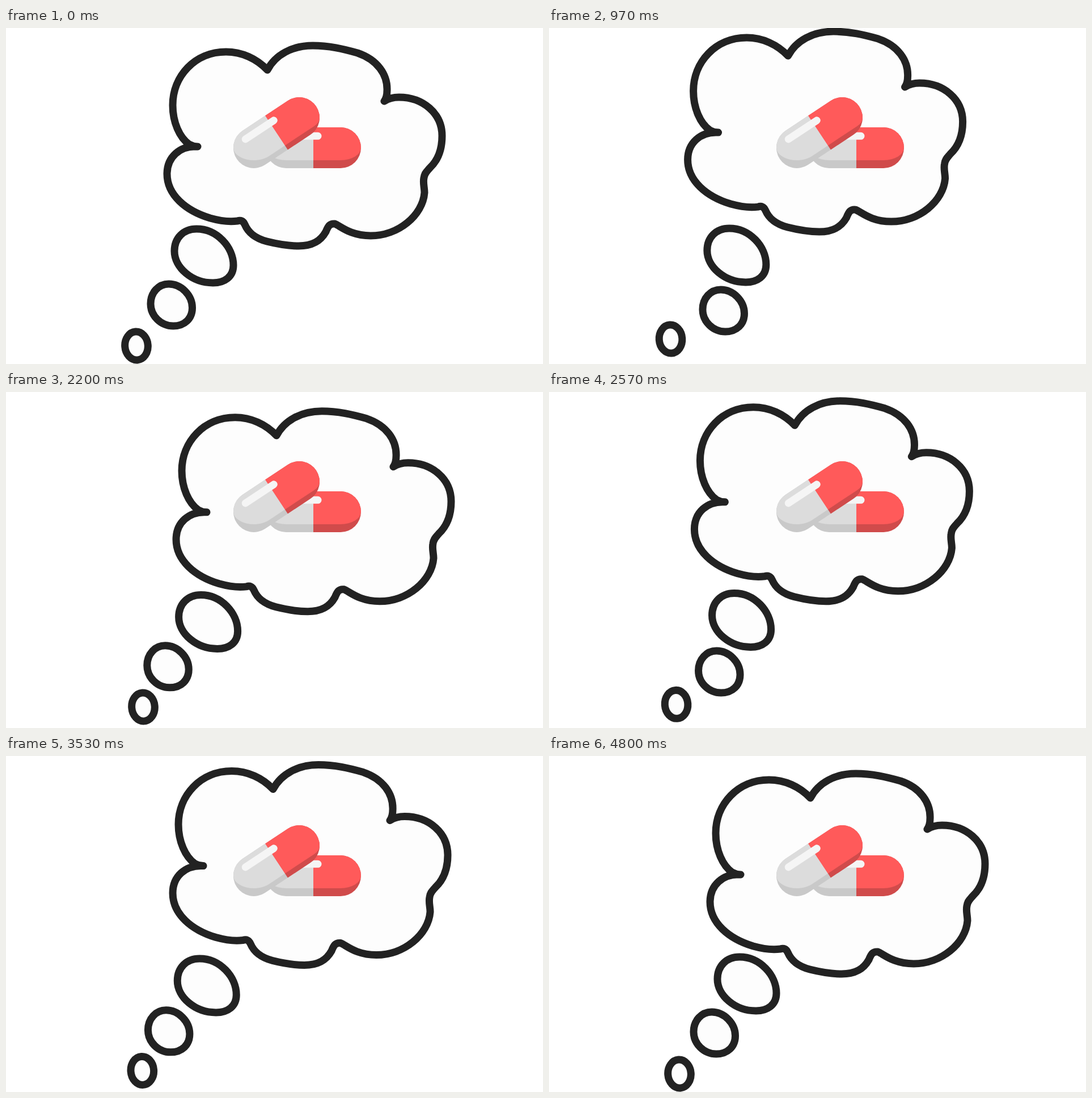
These frames come from a looping animation (947 by 592 pixels, 5410 ms). An HTML page:

```html
<!DOCTYPE html>
<html lang="en">
<head>
<meta charset="utf-8">
<title>Thought bubble</title>
<style>
  html, body { margin: 0; width: 100%; height: 100%; overflow: hidden; background: #fff; }
  svg { display: block; width: 100%; height: 100%; }
  .bubble { fill: #fdfdfd; stroke: #222; stroke-width: 13; stroke-linejoin: round; }
  .shine { stroke: #f5f5f5; stroke-width: 13; stroke-linecap: round; }
</style>
</head>
<body>
<svg viewBox="0 0 947 592">
  <defs>
    <clipPath id="lit-flat"><path d="M458 211A36 22 0 0 0 494 233H590A36 22 0 0 0 626 211V100H458Z"/></clipPath>
    <clipPath id="lit-tilted"><path d="M401 211A36 22 0 0 0 463.4 225.9L543.4 172.9A36 22 0 0 0 553 158V100H401Z"/></clipPath>
    <path id="left" d="M.3 -36H-48A36 36 0 0 0 -48 36H.3Z"/>
    <path id="right" d="M0 -36H48A36 36 0 0 1 48 36H0Z"/>
  </defs>
  <path id="cloud" class="bubble" d="M461 74C442 54 416 42 388 42C333 42 294 85 294 136C294 166 306 193 323 205
    Q330 209 338 209C306 207 284 228 284 257C284 294 317 322 360 335C378 340 394 342 408 340Q417 337 421 346
    C427 360 438 370 460 376C480 381 500 384 516 384C541 384 555 375 564 359C568 349 571 344 580 345
    C590 349 607 366 643 366C692 366 735 330 738 290C738 281 735 273 737 264C738 256 742 253 747 247
    C761 234 769 214 769 190C769 150 735 122 693 122Q678 122 667 129Q672 122 672 110
    C673 82 655 56 620 44C595 37 570 31 541 31C505 31 475 47 461 74Z"/>
  <path id="large" class="bubble" d="M297 393C297 370 313 354 336 354C372 354 401 386 401 418C401 438 386 449 365 449C328 449 297 422 297 393Z"/>
  <path id="medium" class="bubble" d="M255 486C255 466 269 451 287 451C309 451 328.5 471 328.5 493C328.5 512 315 525 295 525C273 525 255 507 255 486Z"/>
  <g id="small"><ellipse class="bubble" cx="230" cy="560" rx="20.3" ry="25" transform="rotate(-4 230 560)"/></g>
  <g id="pills"></g>
</svg>
<script>
  const LOOP = 5410;
  const TIMES = [0, 1000, 1930, 2930, 3860, 4800];

  // Offsets from rest at each turning point.
  const PATHS = {
    cloud: [[0, 0], [-39.5, -25], [31, 9], [-52, -25.3], [35, -11.5], [0, 0]],
    large: [[0, 0], [-18.2, -1.1], [13.5, 4.5], [-19, -1.3], [15, 4.6], [0, 0]],
    medium: [[0, 0], [16, 10], [-11.3, -7.3], [16.8, 10.2], [-13.2, -8.5], [0, 0]],
    small: [[0, 0], [-15.5, -12], [18, -3.5], [-15.2, -12.2], [20.6, -2.9], [0, 0]]
  };

  function pill(x, y, angle, clip) {
    const place = `transform="translate(${x} ${y}) rotate(${angle})"`;
    const halves = (grey, red) =>
      `<g ${place}><use href="#left" fill="${grey}"/><use href="#right" fill="${red}"/></g>`;
    return halves('#c9c9c9', '#d04b4b') +
      `<g clip-path="url(#${clip})">${halves('#dcdcdc', '#ff5a5a')}</g>` +
      `<path class="shine" ${place} d="M-52 -20.7H8"/>`;
  }

  document.getElementById('pills').innerHTML =
    pill(542, 211, 0, 'lit-flat') + pill(477, 184.5, -33.5, 'lit-tilted');

  const ease = p => p * p * (3 - 2 * p);

  function render(now) {
    const t = Math.min(now % LOOP, 4799.99);
    const i = TIMES.findLastIndex(start => start <= t);
    const p = ease((t - TIMES[i]) / (TIMES[i + 1] - TIMES[i]));
    for (const [id, path] of Object.entries(PATHS)) {
      const [x, y] = path[i].map((from, axis) => from + (path[i + 1][axis] - from) * p);
      // The cloud leaves its rest position along a slight curve.
      const bow = id === 'cloud' && i === 0 ? 12 * p * (1 - p) : 0;
      document.getElementById(id).setAttribute('transform', `translate(${x.toFixed(2)} ${(y + bow).toFixed(2)})`);
    }
  }

  const origin = performance.now();
  function tick() {
    render(performance.now() - origin);
    requestAnimationFrame(tick);
  }
  tick();
</script>
</body>
</html>
```
